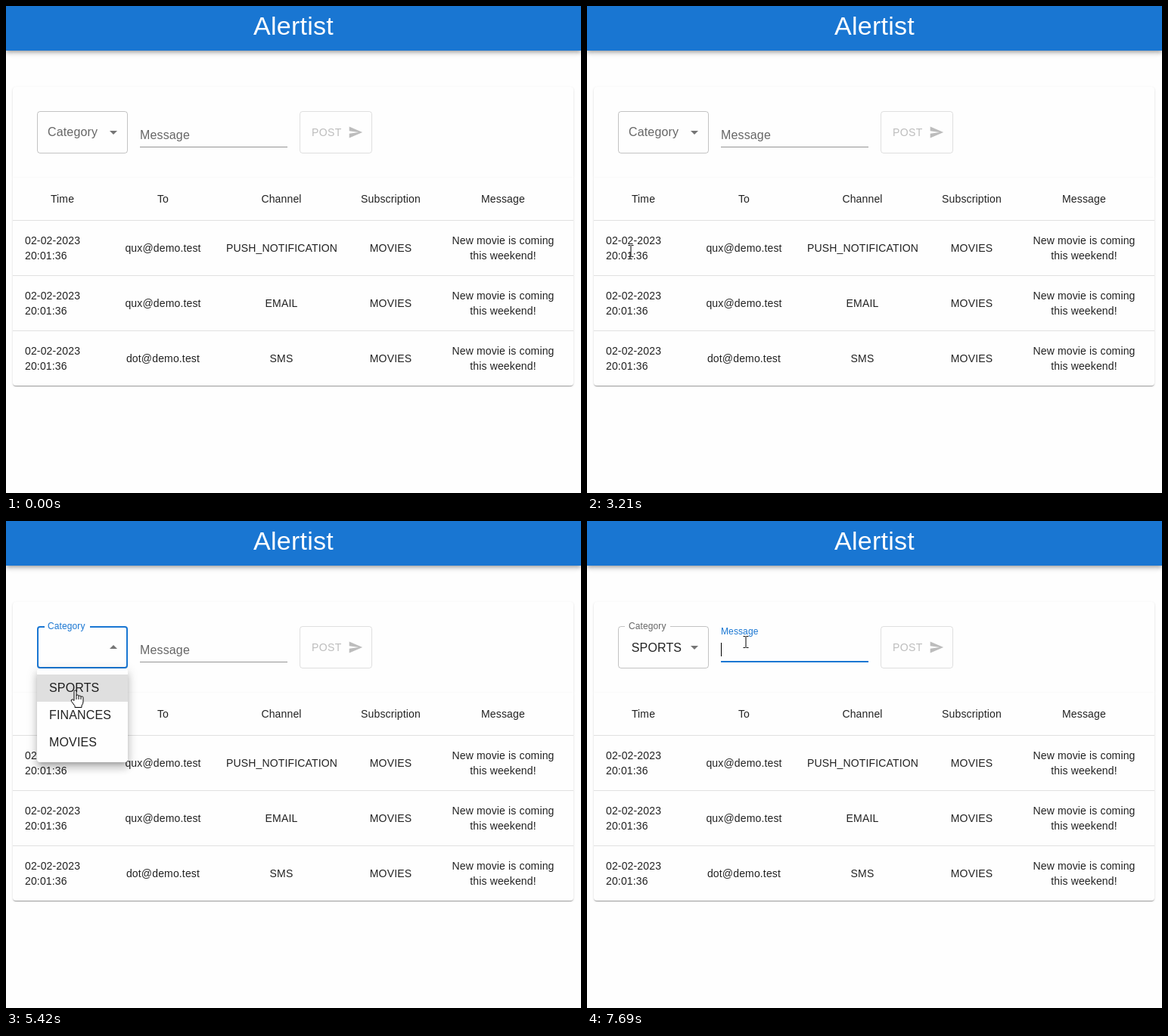
An HTML page that plays this animation: 760x644 px, repeating every 8 s.

```html
<!DOCTYPE html>
<html lang="en">
<head>
<meta charset="utf-8">
<title>Alertist</title>
<style>
  * { box-sizing: border-box; }
  html, body { margin: 0; width: 100%; height: 100%; overflow: hidden; background: #fefefe; }
  body { position: relative; font: 16px/23px "Liberation Sans", Arial, sans-serif; letter-spacing: .15px; color: rgba(0,0,0,.87); cursor: default; }
  body > * { position: absolute; }
  svg { position: absolute; overflow: visible; }
  header { left: 0; top: 0; width: 760px; height: 59px; padding-top: 5px; background: #1976d2; color: #fff;
    font-size: 34px; line-height: 42px; letter-spacing: .25px; text-align: center;
    box-shadow: 0 2px 4px -1px rgba(0,0,0,.2), 0 4px 5px rgba(0,0,0,.14), 0 1px 10px rgba(0,0,0,.12); }
  .paper { left: 9px; width: 741px; background: #fefefe;
    box-shadow: 0 2px 1px -1px rgba(0,0,0,.2), 0 1px 1px rgba(0,0,0,.14), 0 1px 3px rgba(0,0,0,.12); }
  #form { top: 107px; height: 120px; border-radius: 4px 4px 0 0; }
  #list { top: 227px; height: 275px; border-radius: 0 0 4px 4px; }
  table { width: 741px; table-layout: fixed; border-collapse: separate; border-spacing: 0; font-size: 14px; line-height: 20px; text-align: center; }
  th, td { padding: 0 16px; border-bottom: 1px solid #e0e0e0; font-weight: 400; }
  th { height: 57px; }
  td { height: 73px; }
  tr:last-child td { height: 72px; border: 0; }
  td:first-child { text-align: left; }
  .label { transform-origin: 0 0; white-space: nowrap; }
  fieldset { left: 41px; top: 134px; width: 120px; height: 61px; min-width: 0; margin: 0; padding: 0 8px; border: 1px solid; border-radius: 4px; overflow: hidden; }
  legend { height: 11px; padding: 0; overflow: hidden; }
  #value { left: 55px; top: 156px; width: 74px; text-align: center; }
  #arrow { left: 130px; top: 155px; fill: rgba(0,0,0,.54); }
  #line { left: 177px; top: 155px; width: 195px; height: 32px; border-bottom: 1px solid; }
  #focusLine { left: 177px; top: 185px; width: 195px; height: 2px; background: #1976d2; }
  #caret { left: 177px; top: 161px; width: 1px; height: 18px; background: #000; }
  #post { left: 388px; top: 139px; width: 96px; height: 56px; padding: 15px; border: 1px solid rgba(0,0,0,.12); border-radius: 4px;
    color: rgba(0,0,0,.26); font-size: 14px; line-height: 25px; letter-spacing: .4px; }
  #post svg { left: 63px; top: 17px; fill: currentColor; }
  #menu { left: 41px; top: 195px; width: 120px; height: 124px; padding: 8px 0; background: #fefefe; border-radius: 4px; transform-origin: 60px 0;
    box-shadow: 0 5px 5px -3px rgba(0,0,0,.2), 0 8px 10px 1px rgba(0,0,0,.14), 0 3px 14px 2px rgba(0,0,0,.12); }
  .item { position: relative; height: 36px; padding: 6px 16px; overflow: hidden; }
  #ripple { position: absolute; left: -27px; top: -61px; width: 162px; height: 162px; border-radius: 50%; background: rgba(0,0,0,.87); }
  #pointer { left: 0; top: 0; width: 1px; height: 1px; }
</style>
</head>
<body>
<header>Alertist</header>
<div id="form" class="paper"></div>
<div id="list" class="paper">
  <table>
    <colgroup><col width="131"><col width="135"><col width="178"><col width="111"><col width="186"></colgroup>
    <thead><tr><th>Time<th>To<th>Channel<th>Subscription<th>Message</tr></thead>
    <tbody id="rows"></tbody>
  </table>
</div>

<fieldset id="outline"><legend id="notch"></legend></fieldset>
<div id="value">SPORTS</div>
<svg id="arrow" width="24" height="24"><path d="M7 10l5 5 5-5z"/></svg>
<div id="line"></div>
<div id="focusLine"></div>
<div id="caret"></div>
<div id="categoryLabel" class="label" style="left:55px;top:155px">Category</div>
<div id="messageLabel" class="label" style="left:177px;top:159px">Message</div>
<div id="post">POST<svg width="20" height="20" viewBox="0 0 24 24"><path d="M2.01 21 23 12 2.01 3 2 10l15 2-15 2z"/></svg></div>

<div id="menu">
  <div class="item" id="sports">SPORTS<div id="ripple"></div></div>
  <div class="item">FINANCES</div>
  <div class="item">MOVIES</div>
</div>

<svg id="pointer" fill="#fff" stroke="#000">
  <path id="arrowPointer" d="M.5 .5V16.5L4.2 13 6.7 18.5 9 17.5 6.6 12H11.5Z"/>
  <g id="handPointer" stroke-linejoin="round">
    <path d="M-2 13.5V1.5Q-2 0-.5 0T1 1.5V7Q1 6 2.5 6T4 7.5V8Q4 7 5.5 7T7 8.5V9Q7 8 8.5 8T10 9.5V15Q10 18 8 20V22.5H-1V20.5L-5.5 14.5Q-6.5 12.5-5 12T-2 13.5Z"/>
    <path d="M1 7V12M4 8V12M7 9V12" fill="none"/>
  </g>
  <path id="beamPointer" fill="none" d="M-3.5-7.5H-.5M.5-7.5H3.5M-3.5 7.5H-.5M.5 7.5H3.5M0-7V7"/>
</svg>

<script>
const LOOP = 8000, ENTER = 990, OPEN = 4920, PRESS = 6290, CLOSE = 6440, FOCUS = 7480;
const MENU_TIME = 247, FADE = 200;
const $ = id => document.getElementById(id);

const deliveries = [['qux@demo.test', 'PUSH_NOTIFICATION'], ['qux@demo.test', 'EMAIL'], ['dot@demo.test', 'SMS']];
$('rows').innerHTML = deliveries.map(([to, channel]) =>
  `<tr><td>02-02-2023 20:01:36<td>${to}<td>${channel}<td>MOVIES<td>New movie is coming this weekend!</tr>`).join('');

// Pointer stops: x, y, time of arrival, time of leaving where it rests
const stops = [
  [745, 150, ENTER], [426, 166, 1680], [428, 118, 1830], [494, 160, 2080], [372, 159, 2450],
  [271, 239, 2590], [63, 310, 3100], [94, 328, 3410], [198, 182, 3970], [185, 169, 4180, 4290],
  [115, 168, 4520, OPEN], [92, 224, 5420, 5600], [92, 234, 5700], [97, 222, 5830, 6600],
  [172, 157, 7050], [428, 172, 7280], [210, 160, 7500, LOOP]
].map(([x, y, arrive, leave]) => ({ x, y, arrive, leave: leave ?? arrive }));

const fieldBox = [177, 155, 370, 189], selectBox = [41, 139, 161, 195];
const itemsBox = [41, 203, 161, 311], dateBox = [25, 302, 98, 338];

const clamp = v => Math.max(0, Math.min(1, v));
const inside = ([l, t, r, b], [x, y]) => x >= l && x <= r && y >= t && y <= b;

function bezier(x1, x2, y1, y2) {
  const axis = (a, b, u) => 3 * a * u * (1 - u) ** 2 + 3 * b * u * u * (1 - u) + u ** 3;
  return v => {
    v = clamp(v);
    let lo = 0, hi = 1;
    for (let i = 0; i < 20; i++) {
      const mid = (lo + hi) / 2;
      if (axis(x1, x2, mid) < v) lo = mid; else hi = mid;
    }
    return v === 0 || v === 1 ? v : axis(y1, y2, lo);
  };
}
const easeInOut = bezier(.4, .2, 0, 1);
const easeOut = bezier(0, .2, 0, 1);

// Smooth curve through the stops, slowing to a halt where the pointer rests
function speed(i, axis) {
  const a = stops[i - 1], b = stops[i + 1];
  if (!a || !b || stops[i].leave > stops[i].arrive) return 0;
  return (b[axis] - a[axis]) / (b.arrive - a.leave);
}
function pointerAt(t) {
  const i = Math.max(1, stops.findIndex(s => s.arrive > t));
  const last = stops.length - 1, end = t >= stops[last].arrive ? last : i;
  const a = stops[end - 1], b = stops[end];
  const span = b.arrive - a.leave, u = clamp((t - a.leave) / span);
  return ['x', 'y'].map(k =>
    a[k] + (b[k] - a[k]) * u * u * (3 - 2 * u) +
    span * u * (1 - u) * (speed(end - 1, k) * (1 - u) - speed(end, k) * u));
}

function pointerKind(t, at) {
  if (t >= OPEN && t < CLOSE + MENU_TIME) return inside(itemsBox, at) ? 'hand' : 'arrow';
  if (inside(selectBox, at)) return 'hand';
  return inside(fieldBox, at) || inside(dateBox, at) ? 'beam' : 'arrow';
}

// How long the pointer has been over the field, counted up to the fade time
function fieldHoverTime(t) {
  let held = 0;
  while (held < FADE && inside(fieldBox, pointerAt(t - held))) held += 5;
  return held;
}

function show(id, on) { $(id).style.visibility = on ? 'visible' : 'hidden'; }

function setLabel(id, shrink, blue, dy) {
  const style = $(id).style;
  style.transform = `translateY(${dy * shrink}px) scale(${1 - .25 * shrink})`;
  style.color = `color-mix(in srgb, #1976d2 ${blue * 100}%, rgba(0,0,0,.6))`;
}

function drawSelect(t, at) {
  const active = t >= OPEN && t < FOCUS;
  const shrink = easeOut((t - OPEN) / FADE);
  setLabel('categoryLabel', shrink, shrink - easeOut((t - FOCUS) / FADE), -25);
  $('outline').style.border = active ? '2px solid #1976d2' : `1px solid rgba(0,0,0,${inside(selectBox, at) ? .87 : .23})`;
  $('notch').style.width = 59.6 * easeOut((t - OPEN - 50) / 100) + 'px';
  $('arrow').style.transform = t >= OPEN && t < CLOSE ? 'rotate(180deg)' : '';
  show('value', t >= CLOSE);
}

function drawField(t) {
  const focus = easeOut((t - FOCUS) / FADE);
  setLabel('messageLabel', focus, focus, -21.5);
  const held = fieldHoverTime(t);
  $('line').style.borderBottom = `${held ? 2 : 1}px solid rgba(0,0,0,${.42 + .45 * easeInOut(held / FADE)})`;
  $('focusLine').style.transform = `scaleX(${focus})`;
  show('caret', t >= FOCUS);
}

function drawMenu(t) {
  const opacity = easeInOut((t - OPEN) / MENU_TIME) - easeInOut((t - CLOSE) / MENU_TIME);
  const grow = easeInOut((t - OPEN) / (MENU_TIME * .666)) -
    easeInOut((t - CLOSE - MENU_TIME * .333) / (MENU_TIME * .666));
  $('menu').style.opacity = opacity;
  $('menu').style.transform = `scale(${.75 + .25 * grow},${.5625 + .4375 * grow})`;
  $('sports').style.background = t >= CLOSE ? 'rgba(25,118,210,.12)' : 'rgba(0,0,0,.12)';
  const spread = easeInOut((t - PRESS) / 550);
  $('ripple').style.transform = `scale(${spread})`;
  $('ripple').style.opacity = .1 + .2 * spread;
}

function drawPointer(t, at) {
  const kind = t < ENTER ? '' : pointerKind(t, at);
  for (const name of ['arrow', 'hand', 'beam']) show(name + 'Pointer', name === kind);
  $('pointer').style.transform = `translate(${Math.round(at[0])}px,${Math.round(at[1])}px)`;
}

function draw(now) {
  const t = now % LOOP, at = pointerAt(t);
  drawSelect(t, at);
  drawField(t);
  drawMenu(t);
  drawPointer(t, at);
  requestAnimationFrame(draw);
}
draw(0);
</script>
</body>
</html>
```
